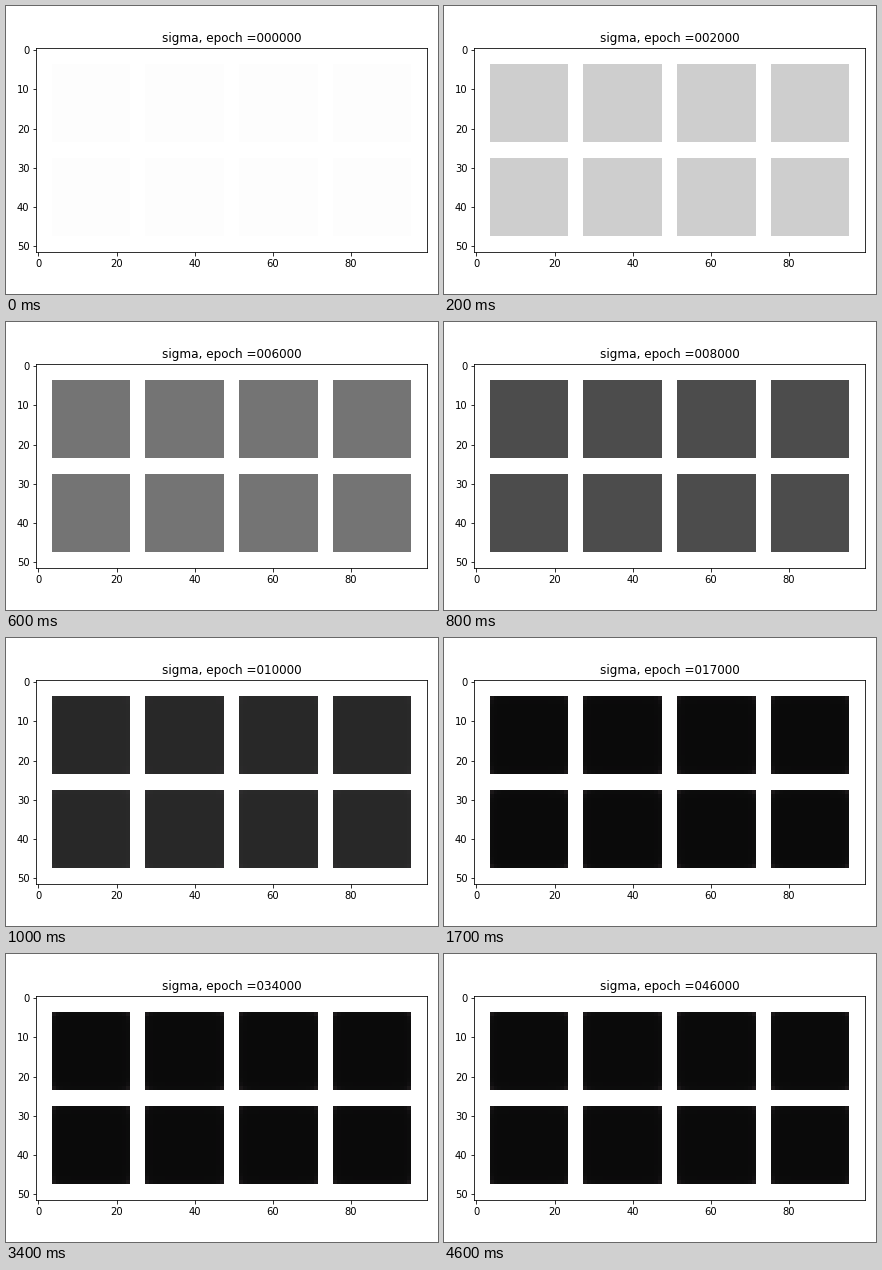
Write a matplotlib script that moves like this. It is 432 px wide and 288 px high and loops after 4.7 s.

```python
import numpy as np
import matplotlib.pyplot as plt
from matplotlib.animation import FuncAnimation

FRAMES, STEP_MS = 47, 100
ROWS, COLS, TILE, PAD = 2, 4, 20, 4
FLOOR = 10

plt.rcParams["font.family"] = "DejaVu Sans"


def level(k):
    """Grey level of the tiles: a slowing descent that stops at the floor."""
    if k >= 12:
        return FLOOR
    return 253 - 23.25 * k + 0.2083 * k * (k - 4) + 0.02917 * k * (k - 4) * (k - 6)


def make_tile(k):
    tile = np.full((TILE, TILE, 3), level(k))
    # Borders stay a little lighter once the tiles have gone dark.
    dark = np.clip((k - 9) / 3, 0, 1)
    edge = np.minimum(np.arange(TILE), np.arange(TILE)[::-1])
    rim = np.exp(-1.2 * edge)
    glow = 2 * np.maximum.outer(rim, rim) + 14 * np.outer(rim, rim)
    return tile + dark * glow[..., None] * np.array([1.0, 0.8, 0.9])


def make_grid(k):
    pitch = TILE + PAD
    grid = np.full((ROWS * pitch + PAD, COLS * pitch + PAD, 3), 255.0)
    tile = make_tile(k)
    for r in range(ROWS):
        for c in range(COLS):
            y, x = PAD + r * pitch, PAD + c * pitch
            grid[y:y + TILE, x:x + TILE] = tile
    return np.clip(np.rint(grid), 0, 255).astype(np.uint8)


def caption(k):
    return f"sigma, epoch ={k * 1000:06d}"


fig, ax = plt.subplots(figsize=(6, 4), dpi=72)
image = ax.imshow(make_grid(0), interpolation="nearest")
title = ax.set_title(caption(0))
fig.tight_layout()


def update(k):
    image.set_data(make_grid(k))
    title.set_text(caption(k))
    return image, title


anim = FuncAnimation(fig, update, frames=FRAMES, interval=STEP_MS,
                     repeat=True, repeat_delay=0, blit=False)
plt.show()
```
